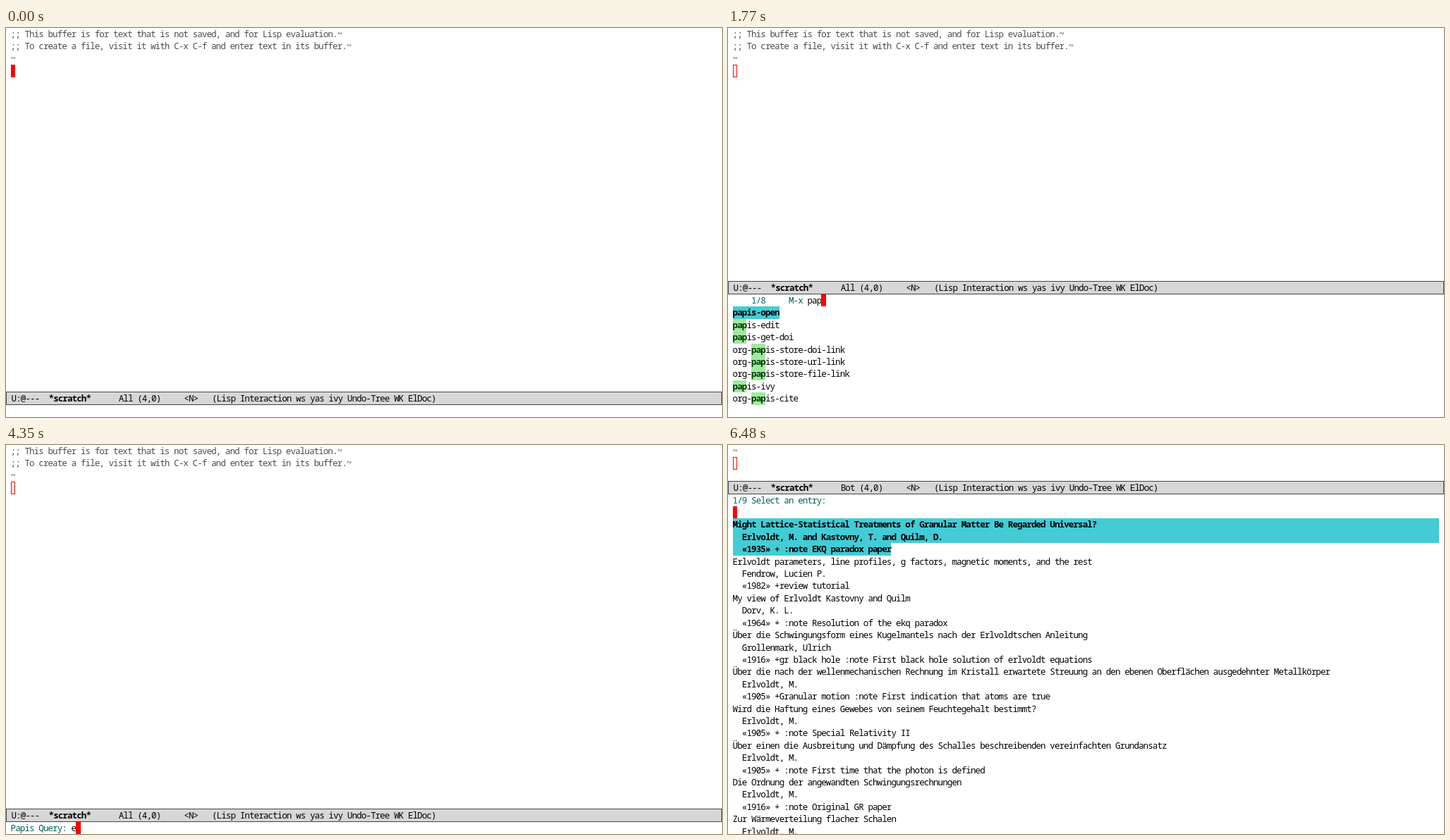
An HTML page that plays this animation: 1015x552 px, repeating every 8 s.

```html
<!DOCTYPE html>
<html lang="en">
<head>
<meta charset="utf-8">
<title>Emacs session</title>
<style>
  html, body { margin: 0; width: 100%; height: 100%; overflow: hidden; background: #fff; }
  #stage {
    position: relative; width: 1015px; height: 552px; overflow: hidden;
    font: 12.5px/17.4px "Noto Sans Mono", "DejaVu Sans Mono", monospace;
    font-stretch: condensed; font-variant-ligatures: none; color: #000; white-space: pre;
  }
  .line { position: absolute; left: 6.6px; height: 17.4px; }
  .line > * { display: inline-block; height: 17.4px; vertical-align: top; }
  .comment { color: #4d4d4d; }
  .prompt { color: #005f5f; }
  .selected { background: #43ccd5; }
  .wide { width: 1001.4px; }
  .match { background: #a2e8a2; color: #003c00; }
  .match2 { background: #bbbbff; }
  .cursor { background: #f00; color: #fff; }
  .hollow { box-shadow: inset 0 0 0 1px #f00; }
  .mode {
    position: absolute; left: 0; width: 100%; height: 19px; box-sizing: border-box;
    padding-left: 6.6px; border: 1px solid #444; background: #d7d7d7; line-height: 17px;
  }
</style>
</head>
<body>
<div id="stage"></div>
<script>
const LOOP = 8000, HEIGHT = 552, ROW = 17.41, CELL = 6.614;
const stage = document.getElementById("stage");

const BUFFER = [
  ";; This buffer is for text that is not saved, and for Lisp evaluation.~",
  ";; To create a file, visit it with C-x C-f and enter text in its buffer.~",
  "~"
];
const RECENT = `lispy-brackets-auto-wrap special-lispy-clone evil-forward-WORD-begin
  enable-theme rng-what-schema vc-git-stash-snapshot magit-submodule-update
  counsel-compile-env url-setup-privacy-info`.split(/\s+/);
const BROAD = `papis-open papis-edit forward-paragraph evil-backward-paragraph
  TeX-latex-mark-paragraph-environment magit-log-move-to-parent package-install
  lispy-parens-auto-wrap list-packages`.split(/\s+/);
const PAPIS = `papis-open papis-edit papis-get-doi org-papis-store-doi-link
  org-papis-store-url-link org-papis-store-file-link papis-ivy org-papis-cite`.split(/\s+/);

const ENTRIES = `Might Lattice-Statistical Treatments of Granular Matter Be Regarded Universal?
  Erlvoldt, M. and Kastovny, T. and Quilm, D.
  «1935» + :note EKQ paradox paper
Erlvoldt parameters, line profiles, g factors, magnetic moments, and the rest
  Fendrow, Lucien P.
  «1982» +review tutorial
My view of Erlvoldt Kastovny and Quilm
  Dorv, K. L.
  «1964» + :note Resolution of the ekq paradox
Über die Schwingungsform eines Kugelmantels nach der Erlvoldtschen Anleitung
  Grollenmark, Ulrich
  «1916» +gr black hole :note First black hole solution of erlvoldt equations
Über die nach der wellenmechanischen Rechnung im Kristall erwartete Streuung an den ebenen Oberflächen ausgedehnter Metallkörper
  Erlvoldt, M.
  «1905» +Granular motion :note First indication that atoms are true
Wird die Haftung eines Gewebes von seinem Feuchtegehalt bestimmt?
  Erlvoldt, M.
  «1905» + :note Special Relativity II
Über einen die Ausbreitung und Dämpfung des Schalles beschreibenden vereinfachten Grundansatz
  Erlvoldt, M.
  «1905» + :note First time that the photon is defined
Die Ordnung der angewandten Schwingungsrechnungen
  Erlvoldt, M.
  «1916» + :note Original GR paper
Zur Wärmeverteilung flacher Schalen
  Erlvoldt, M.`.split("\n");

// [start time, typed command]
const TYPING = [
  [1000, ""], [1660, "pa"], [1770, "pap"], [1890, "papi"], [1970, "papis"],
  [2060, "papis "], [2150, "papis o"], [2360, "papis op"], [2450, "papis ope"], [2590, "papis open"]
];
const QUERY = "erlvoldt";

const span = (cls, text) => `<span class="${cls}">${text}</span>`;
const selected = (text, cls = "") => `<b class="selected ${cls}">${text}</b>`;
const prompt = text => span("prompt", text);
const cursor = (ch = " ") => span("cursor", ch);
const lines = (rows, top, cls = "") => rows.map((html, i) =>
  `<div class="line ${cls}" style="top:${top + i * ROW}px">${html}</div>`).join("");

function screen(minibuffer, top = HEIGHT - minibuffer.length * ROW, { active = true, scroll = 0 } = {}) {
  const buffer = BUFFER.slice(scroll);
  const point = span(active ? "hollow" : "cursor", " ");
  const place = scroll ? "Bot" : "All";
  return lines(buffer, 0, "comment") + lines([point], buffer.length * ROW) +
    `<div class="mode" style="top:${top - 19}px">U:@---  <b>*scratch*</b>      ${place} (4,0)` +
    "     &lt;N&gt;   (Lisp Interaction ws yas ivy Undo-Tree WK ElDoc)</div>" +
    lines(minibuffer, top);
}

function candidates(typed) {
  if (!typed) return [RECENT, 10420];
  if (typed === "pa") return [BROAD, 512];
  const pattern = new RegExp(typed.trim().replace(" ", ".*?"));
  const found = PAPIS.filter(name => pattern.test(name));
  return [found, found.length];
}

function highlight(name, typed) {
  const [first, second] = typed.trim().split(" ");
  if (!first) return name;
  const start = name.indexOf(first), end = start + first.length;
  let rest = name.slice(end);
  if (second) rest = rest.replace(second, `<b class="match2">${second}</b>`);
  return `${name.slice(0, start)}<b class="match">${first}</b>${rest}`;
}

function command(time) {
  const typed = TYPING.findLast(([start]) => time >= start)[1];
  const [names, total] = candidates(typed);
  const counter = `    1/${total}`.padEnd(12) + "M-x ";
  const busy = time >= 2590;
  const input = busy
    ? cursor() + prompt(counter.slice(1)) + typed
    : prompt(counter) + typed + cursor();
  const rows = names.map((name, i) => i ? highlight(name, typed) : selected(name));
  return screen([input, ...rows], HEIGHT - 10 * ROW);
}

function query(time) {
  const busy = time >= 6040;
  const count = time < 5510 ? 1 : Math.min(QUERY.length, 2 + Math.floor((time - 5510) / 75.7));
  const typed = QUERY.slice(0, count);
  return screen([busy
    ? cursor("P") + prompt("apis Query: ") + typed
    : prompt("Papis Query: ") + typed + cursor()]);
}

function results() {
  const rows = ENTRIES.map((text, i) => i < 3 ? selected(text, i < 2 ? "wide" : "") : text);
  return screen([prompt("1/9 Select an entry:"), cursor(), ...rows], 69.6, { scroll: 2 });
}

function view(time) {
  if (time < 1000) return screen([""], undefined, { active: false });
  if (time < 4350) return command(time);
  if (time < 6480) return query(time);
  return results();
}

// Set every glyph on the terminal's cell grid.
stage.innerHTML = `<span>${"0".repeat(100)}</span>`;
const advance = stage.firstChild.getBoundingClientRect().width / 100;
stage.style.letterSpacing = `${CELL - advance}px`;

let shown = "";
function draw() {
  const html = view(performance.now() % LOOP);
  if (html !== shown) stage.innerHTML = shown = html;
  requestAnimationFrame(draw);
}
draw();
</script>
</body>
</html>
```
